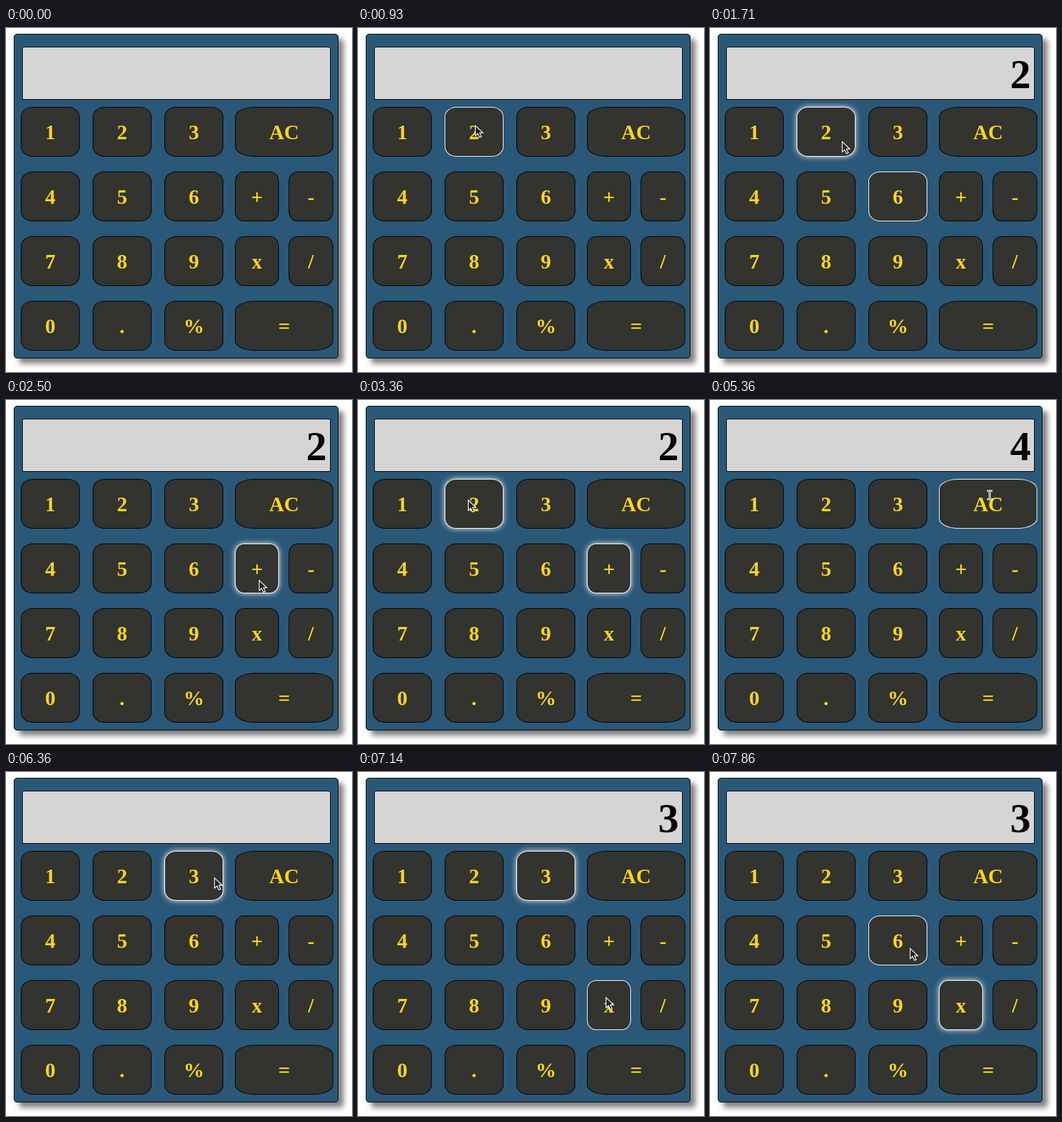
An HTML page for the animation above (8 s loop, 535 px wide and 532 px high).

```html
<!DOCTYPE html>
<html lang="en">
<head>
<meta charset="utf-8">
<title>Calculator</title>
<style>
html, body { margin: 0; width: 100%; height: 100%; overflow: hidden; background: #fff; }
body { position: relative; font-family: "Liberation Serif", serif; font-weight: bold; }
div { position: absolute; box-sizing: border-box; }
#case {
  left: 12px; top: 9px; width: 502px; height: 502px;
  background: #2a5879; border: 1px solid #000; border-radius: 5px;
  box-shadow: 8px 8px 8px #808080;
}
#display {
  left: 25px; top: 29px; width: 477px; height: 82px; padding: 6px 5px 0 0;
  background: #d6d5d3; border: 1px solid #000; border-radius: 4px / 2px;
  font-size: 64px; line-height: 71px; text-align: right;
}
.key {
  height: 77px; padding-top: 20px;
  background: #33332f; border: 1px solid #000; border-radius: 20%;
  color: #ffd712; font-size: 32px; line-height: 36px; text-align: center;
}
.hover, .focus { border-color: #fff; }
.focus { box-shadow: 0 0 8px #f4eeea; }
svg { position: absolute; left: 0; top: 0; width: 20px; height: 20px; overflow: visible; }
svg path { fill: #222; stroke: #fff; stroke-width: 1.2; }
</style>
</head>
<body>
<div id="case"></div>
<div id="display"></div>
<svg id="arrow"><path d="M.5 .8V16.6L4.3 13.2L7 19.3L9.8 18.1L7.2 12.2H12.3Z"/></svg>
<svg id="beam"><path d="M-3.5-7.5h2.5l1 1 1-1h2.5v2h-2.5v11h2.5v2h-2.5l-1-1-1 1h-2.5v-2h2.5v-11h-2.5z"/></svg>
<script>
const LOOP = 8000, FPS = 14, HOVER_LEAD = 2;
const $ = id => document.getElementById(id);
const display = $('display'), arrow = $('arrow'), beam = $('beam');
const toTick = ms => Math.floor((ms + 5) * FPS / 1000);

const keys = ['1 2 3 AC', '4 5 6 + -', '7 8 9 x /', '0 . % ='].flatMap((row, r) =>
  row.split(' ').map((label, c) => {
    const wide = label === 'AC' || label === '=';
    const left = c < 3 ? 23 + c * 111 : 354 + (c - 3) * 83;
    const width = c < 3 ? 91 : wide ? 152 : 65 + c;
    const top = 122 + r * 100;
    const el = document.createElement('div');
    el.className = 'key';
    el.textContent = label;
    el.style.cssText = `left:${left}px;top:${top}px;width:${width}px`;
    document.body.insertBefore(el, arrow);
    return { label, wide, left, top, width, height: 77, el };
  }));

// Pointer trips: travel from move to rest, key glows from press to blur
const start = { x: 185, y: 8 };
const visits = [
  { key: '2',  x: 181, y: 150, move: 640,  rest: 930,  press: 1360, blur: 2500 },
  { key: '+',  x: 391, y: 278, move: 1570, rest: 2210, press: 2500, blur: 3500, sag: 60 },
  { key: '2',  x: 170, y: 154, move: 2930, rest: 3210, press: 3360, blur: 4290 },
  { key: '=',  x: 432, y: 464, move: 3710, rest: 3930, press: 4210, blur: 5360 },
  { key: 'AC', x: 432, y: 147, move: 4790, rest: 5290, press: 5430, blur: 5790 },
  { key: '3',  x: 322, y: 163, move: 5790, rest: 6070, press: 6360, blur: 7360 },
  { key: 'x',  x: 383, y: 348, move: 6790, rest: 7140, press: 7290, blur: LOOP },
  { key: '6',  x: 309, y: 272, move: 7640, rest: 7860 }
];
const readouts = [
  { at: 0, text: '' }, { at: 1360, text: '2' }, { at: 4290, text: '4' },
  { at: 5790, text: '' }, { at: 6430, text: '3' }
];

const easeInOut = p => p < .5 ? 4 * p ** 3 : 1 - 4 * (1 - p) ** 3;
const inside = (p, k) => p.x >= k.left && p.x < k.left + k.width &&
                         p.y >= k.top && p.y < k.top + k.height;
const overLabel = (p, k) => k.wide && inside(p, k) &&
                            Math.abs(p.y - k.top - k.height / 2) < 18;

function pointerAt(tick, index) {
  const to = visits[index], from = visits[index - 1] || start;
  const first = toTick(to.move), last = toTick(to.rest);
  const e = easeInOut(Math.min(1, (tick - first + 1) / (last - first + 1)));
  return {
    x: Math.round(from.x + (to.x - from.x) * e),
    y: Math.round(from.y + (to.y - from.y) * e + 2 * e * (1 - e) * (to.sag || 0))
  };
}

function render(ms) {
  const tick = toTick(ms % LOOP);
  const index = visits.filter(v => toTick(v.move) <= tick).length - 1;
  const visible = index >= 0;
  const pointer = visible ? pointerAt(tick, index) : start;
  const ahead = visible && pointerAt(tick + HOVER_LEAD, index);
  const glowing = visits.filter(v => toTick(v.press) <= tick && tick < toTick(v.blur));

  for (const key of keys) {
    key.el.classList.toggle('hover', visible && inside(ahead, key));
    key.el.classList.toggle('focus', glowing.some(v => v.key === key.label));
  }
  display.textContent = readouts.filter(r => toTick(r.at) <= tick).pop().text;

  const isBeam = keys.some(key => overLabel(pointer, key));
  arrow.style.display = visible && !isBeam ? 'block' : 'none';
  beam.style.display = visible && isBeam ? 'block' : 'none';
  arrow.style.transform = `translate(${pointer.x}px, ${pointer.y}px)`;
  beam.style.transform = `translate(${pointer.x + .5}px, ${pointer.y}px)`;
}

function loop(now) {
  render(now);
  requestAnimationFrame(loop);
}
render(0);
requestAnimationFrame(loop);
</script>
</body>
</html>
```
